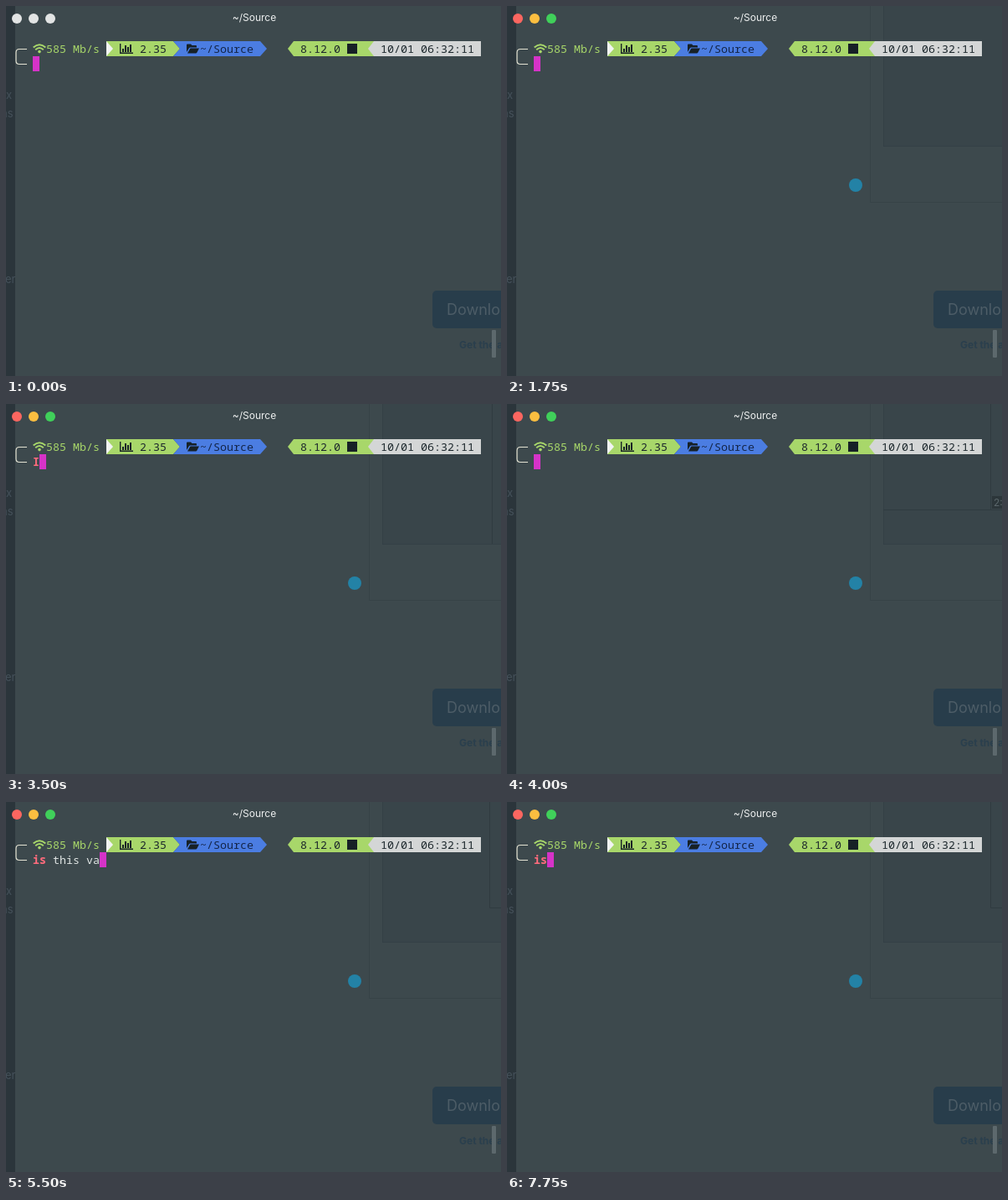
An HTML page that plays this animation: 592x442 px, repeating every 8000 ms.

```html
<!DOCTYPE html>
<html lang="en">
<head>
<meta charset="utf-8">
<title>Terminal</title>
<style>
html, body { margin: 0; width: 100%; height: 100%; overflow: hidden; background: #3d494d; }
svg { display: block; width: 592px; height: 442px; }
text { white-space: pre; }
.mono { font: 300 13.333px "Noto Sans Mono", "Liberation Mono", monospace; }
.ui { font-family: Inter, Roboto, sans-serif; }
.line { fill: none; stroke: #303b40; }
</style>
</head>
<body>
<svg viewBox="0 0 592 442">
  <rect width="592" height="442" fill="#3d494d"/>

  <!-- page showing through the window -->
  <rect width="11" height="442" fill="#2b353b"/>
  <g class="ui" font-size="13" fill="#45515a">
    <text x="0" y="111">x</text>
    <text x="-6" y="133">ns</text>
    <text x="-1" y="331">er</text>
  </g>
  <rect x="510" y="340" width="100" height="45" rx="5" fill="#283d4b"/>
  <text class="ui" x="527" y="369" font-size="18" fill="#4d5d67">Download</text>
  <text class="ui" x="542" y="409" font-size="12" font-weight="700" fill="#2a3f4d">Get the app</text>
  <rect x="581" y="387" width="5" height="33" rx="1" fill="#5d696d"/>

  <!-- windows behind -->
  <g id="behind">
    <rect x="450" y="0" width="142" height="168" fill="#39454a"/>
    <path class="line" stroke-opacity=".45" d="M434.5 0V234.5H592"/>
    <path class="line" stroke-opacity=".45" d="M450.5 0V167.5H592"/>
  </g>
  <path class="line" id="edge"/>
  <g id="tag">
    <rect x="580" y="110" width="12" height="15" fill="#2c363a"/>
    <text class="ui" x="582" y="122" font-size="12" fill="#5b676b">2:</text>
  </g>

  <!-- title bar -->
  <g id="lights">
    <circle cx="13" cy="15" r="6"/>
    <circle cx="33" cy="15" r="6"/>
    <circle cx="53" cy="15" r="6"/>
  </g>
  <text class="ui" x="297" y="18" font-size="12" text-anchor="middle" fill="#eef0f0">~/Source</text>

  <!-- prompt -->
  <path d="M25 51.5H16Q12 51.5 12 55.5V65.5Q12 69.5 16 69.5H25" fill="none" stroke="#e4e3d3" stroke-width="1.2"/>
  <g fill="none" stroke="#a8d76a" stroke-width="2">
    <path d="M32.7 49.6Q40 42.8 47.3 49.6M35.2 52.2Q40 47.8 44.8 52.2"/>
    <circle cx="40" cy="54.6" r="1.8" fill="#a8d76a" stroke="none"/>
  </g>
  <path d="M120 42H200L208 51L200 60H120Z" fill="#a8d76a"/>
  <path d="M120 42L128 51L120 60Z" fill="#f2f4f2"/>
  <path d="M200 42H304L312 51L304 60H200L208 51Z" fill="#4b7de2"/>
  <path d="M344 42H440V60H344L337 51Z" fill="#a8d76a"/>
  <path d="M440 42H568V60H440L433 51Z" fill="#d4d6d6"/>
  <g fill="#172126">
    <path d="M136 45h1.4v10.6H152V57H136ZM139 51h2v4h-2ZM142 47h2v8h-2ZM145 49h2v6h-2ZM148 46h2v9h-2Z"/>
    <path d="M216 55V46.5Q216 45.5 217 45.5H221L222.5 47H227Q228 47 228 48V49.5H220.5Q219.4 49.5 218.8 50.4ZM217 56.5L219.8 51.4Q220.2 50.6 221 50.6H231L228.4 55.6Q228 56.5 227 56.5Z"/>
    <rect x="408" y="45" width="12" height="12"/>
  </g>
  <g class="mono">
    <text x="48" y="56" fill="#a8d76a">585 Mb/s</text>
    <g fill="#1c272c">
      <text x="160" y="56">2.35</text>
      <text x="232" y="56" fill="#14264a">~/Source</text>
      <text x="352" y="56">8.12.0</text>
      <text x="448" y="56">10/01 06:32:11</text>
    </g>
    <text x="32" y="74" fill="#dfe4e3"><tspan id="cmd" fill="#ff6b7c" font-weight="700"></tspan><tspan id="args"></tspan></text>
  </g>
  <rect id="cursor" y="60" width="8" height="18" fill="#d633c8"/>

  <circle id="dot" fill="#2382a6"/>
</svg>
<script>
const $ = id => document.getElementById(id);
const set = (el, attrs) => { for (const k in attrs) el.setAttribute(k, attrs[k]); };
const show = (id, on) => set($(id), { visibility: on ? "visible" : "hidden" });

const typed = [
  [0, ""], [2750, "I"], [3000, "Is"], [3500, "I"], [4000, ""], [4250, "i"],
  [4500, "is "], [4750, "is this"], [5000, "is this v"], [5250, "is this va"],
  [5750, "is this vali"], [6000, "is this valid"], [6500, "is this vali"],
  [7000, "is this val"], [7250, "is this "], [7500, "is th"], [7750, "is"]
];
const edges = [
  [0, ""], [3500, "M581.5 0V167"], [3750, "M578.5 0V167"],
  [4000, "M578.5 0V126.5M450 126.5H592"], [4750, "M578.5 0V126.5H592"]
];
const dots = [
  [0, [0, 0, 0, 0]], [1000, [413.5, 234, 10.5, .8]], [1250, [413, 234, 10, .5]],
  [1500, [0, 0, 0, 0]], [1750, [417, 214, 8, 1]]
];
const at = (steps, t) => steps.findLast(s => s[0] <= t)[1];

function draw(t) {
  const line = at(typed, t), [cmd] = line.split(" ");
  $("cmd").textContent = cmd;
  $("args").textContent = line.slice(cmd.length);
  set($("cursor"), { x: 32 + 8 * line.length });

  const active = t >= 1000;
  [...$("lights").children].forEach((c, i) =>
    set(c, { fill: active ? ["#fb6660", "#fbbe40", "#40d05a"][i] : "#e2e4e4" }));

  show("behind", t >= 500);
  set($("edge"), { d: at(edges, t) });
  show("tag", t >= 4000 && t < 4750);

  const [cx, cy, r, opacity] = at(dots, t);
  set($("dot"), { cx, cy, r, opacity });
}

const start = performance.now();
function tick() {
  draw((performance.now() - start) % 8000);
  requestAnimationFrame(tick);
}
tick();
</script>
</body>
</html>
```
